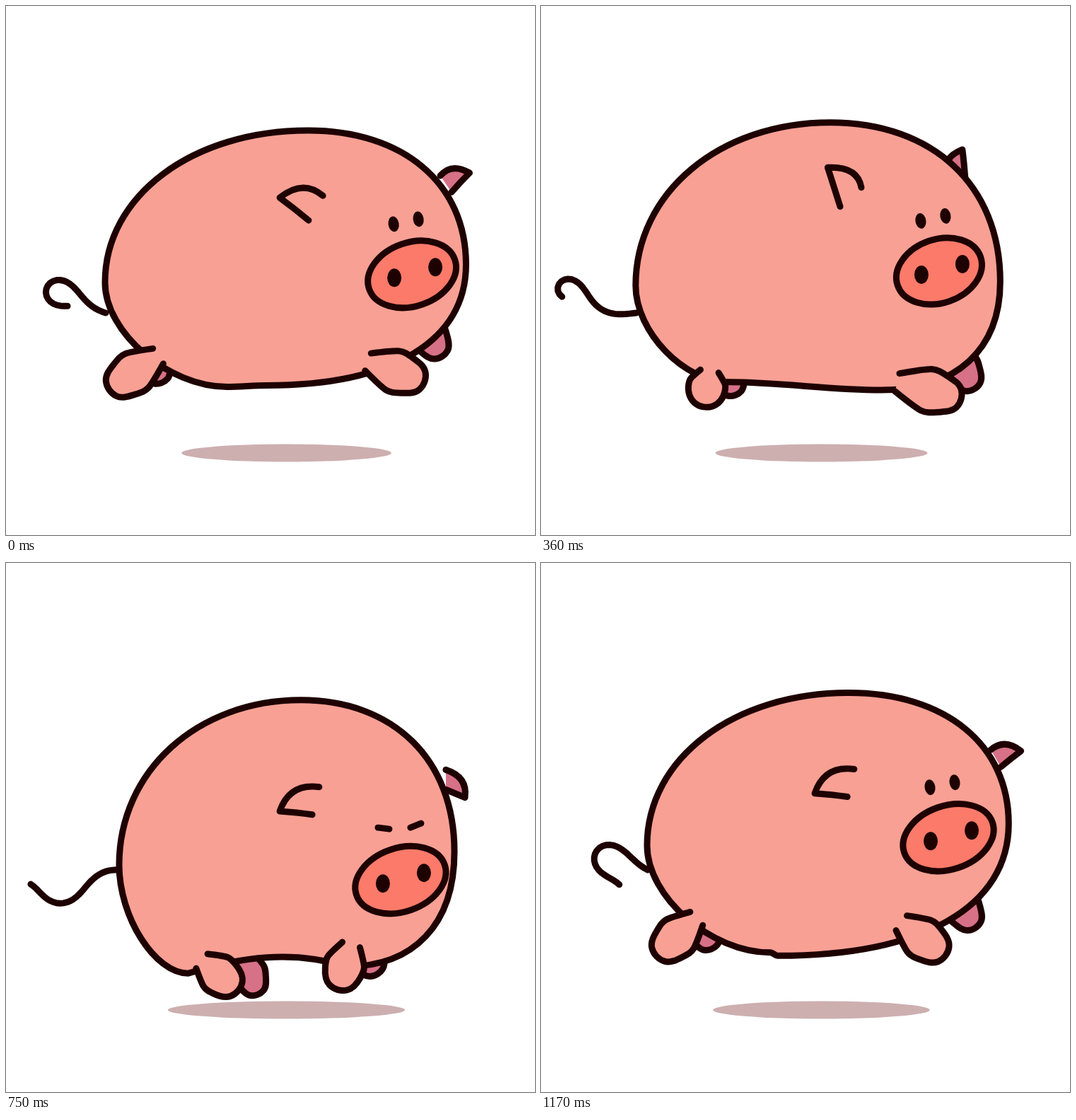
Animation of 748 by 748 pixels, one loop 1200 ms. Source, as an HTML page with a canvas:

```html
<!DOCTYPE html>
<html lang="en">
<head>
<meta charset="utf-8">
<title>Running pig</title>
<style>
  html, body { margin: 0; width: 100%; height: 100%; overflow: hidden; background: #fff; }
  canvas { display: block; }
</style>
</head>
<body>
<canvas id="stage" width="748" height="748"></canvas>
<script>
const ctx = document.getElementById('stage').getContext('2d');
const INK = '#1e0202', SKIN = '#f9a094', SNOUT = '#fc7a6a', FAR = '#d77187', SHADOW = '#cdafb0';
const STEP = 30, POSES = 10, LINE = 9, RAD = Math.PI / 180;
let pose = 0;

// Value that swings once per stride, with an optional bounce twice per stride.
// Peaks are given in poses.
function swing(mean, amp, peak, bounce = 0, bouncePeak = 0) {
  const turn = 2 * Math.PI / POSES;
  return mean + amp * Math.cos(turn * (pose - peak))
    + bounce * Math.cos(2 * turn * (pose - bouncePeak));
}

const lerp = (a, b, t) => [a[0] + (b[0] - a[0]) * t, a[1] + (b[1] - a[1]) * t];

function paint(fill, width = LINE) {
  if (fill) { ctx.fillStyle = fill; ctx.fill(); }
  if (width) { ctx.lineWidth = width; ctx.stroke(); }
}

function oval(x, y, rx, ry, tilt, fill, width = 0) {
  ctx.beginPath();
  ctx.ellipse(x, y, rx, ry, tilt, 0, Math.PI * 2);
  paint(fill, width);
}

function line(x1, y1, x2, y2, width) {
  ctx.beginPath();
  ctx.moveTo(x1, y1);
  ctx.lineTo(x2, y2);
  paint(null, width);
}

// Open smooth curve; tangents are exact for points on an arc.
function spline(points) {
  const handle = (i, dir) => {
    const [x, y] = points[i], [px, py] = points[i - 1], [nx, ny] = points[i + 1];
    const d1 = Math.hypot(x - px, y - py), d2 = Math.hypot(nx - x, ny - y);
    const tx = (x - px) / d1 * d2 + (nx - x) / d2 * d1;
    const ty = (y - py) / d1 * d2 + (ny - y) / d2 * d1;
    const k = dir * 0.345 * (dir > 0 ? d2 : d1) / Math.hypot(tx, ty);
    return [x + tx * k, y + ty * k];
  };
  const last = points.length - 1;
  ctx.beginPath();
  ctx.moveTo(...points[0]);
  for (let i = 0; i < last; i++) {
    const c1 = handle(Math.max(i, 1), i ? 1 : -1);
    const c2 = i + 1 < last ? handle(i + 1, -1) : handle(i, 1);
    ctx.bezierCurveTo(...c1, ...c2, ...points[i + 1]);
  }
}

// Egg of four quarter curves between its extremes, with an arching belly.
function body() {
  const left = [swing(150, 17, 6.5), swing(409, 20, 5.7)];
  const top = [swing(422, 16, 8), swing(180.5, 11, 6, 7, 4.3)];
  const right = [swing(650, 12, 8.7, 8, 2.7), swing(383, 36, 3.5, 20, 3.9)];
  const front = [swing(425, 95, 3.5), swing(557, 18, 5.5, 11, 3.5)];
  const rear = [swing(285, 40, 8.7), swing(554, 22, 5.5, 10, 4.2)];
  const arch = Math.max(0, swing(0, 25, 4.5));
  const third = (front[0] - rear[0]) / 3;
  const quarter = (from, to, corner, fullness) =>
    ctx.bezierCurveTo(...lerp(from, corner, fullness), ...lerp(to, corner, fullness), ...to);

  ctx.beginPath();
  ctx.moveTo(...top);
  quarter(top, right, [right[0], top[1]], 0.605);
  quarter(right, front, [right[0], front[1]], 0.63);
  ctx.bezierCurveTo(front[0] - third, front[1] - arch, rear[0] + third, rear[1] - arch, ...rear);
  quarter(rear, left, [left[0], rear[1]], 0.48);
  quarter(left, top, [left[0], top[1]], 0.57);
  ctx.closePath();
  paint(SKIN);
}

// A wave runs down the tail and grows towards the tip.
function tail() {
  const steps = 30, length = 152;
  let x = swing(151, 17, 6.5), y = 434;
  ctx.beginPath();
  ctx.moveTo(x, y);
  for (let i = 0; i < steps; i++) {
    const s = (i + 0.5) / steps;
    const rise = RAD * swing(10 - 85 * s * s, 20 + 95 * s, 7.6 * s - 2);
    x -= Math.cos(rise) * length / steps;
    y -= Math.sin(rise) * length / steps;
    ctx.lineTo(x, y);
  }
  paint();
}

// Drop shape: from the rear of the hip round the foot to the front of the hip.
function leg(hip, foot, radius, fill) {
  const dx = foot[0] - hip[0], dy = foot[1] - hip[1], len = Math.hypot(dx, dy);
  const along = [dx / len, dy / len], rearward = [-dy / len, dx / len];
  const from = ([x, y], out, down) =>
    [0, 1].map(i => [x, y][i] + rearward[i] * out + along[i] * down);
  const sole = [90, 30, -30, -90].map(a =>
    from(foot, radius * Math.sin(a * RAD), radius * Math.cos(a * RAD)));
  spline([from(hip, 13, 0), ...sole, from(hip, -13, 0)]);
  paint(fill);
}

// Ear flapping about its base; side is -1 or 1, a positive angle droops.
function ear(x, y, side, degrees, length, fill) {
  const a = degrees * RAD, c = Math.cos(a), s = Math.sin(a);
  const at = (out, up) =>
    [x + side * (c * out + s * up) * length, y + (s * out - c * up) * length];
  const baseAngle = (68 + degrees / 2) * RAD;
  const bx = -side * 0.38 * length * Math.cos(baseAngle), by = -0.38 * length * Math.sin(baseAngle);
  ctx.beginPath();
  ctx.moveTo(x + bx, y + by);
  ctx.quadraticCurveTo(...at(0.54, 0.65), ...at(1, 0));
  ctx.quadraticCurveTo(...at(0.56, -0.16), x - bx, y - by);
  paint(fill);
}

function face() {
  const x = swing(566, 10, 9), y = swing(406, 38, 5.7, 8, 5.2);
  oval(x, y, swing(65, 3, 7), 45, -0.33, SNOUT, LINE);
  oval(x - 25, y + 5, 10, 13, 0, INK);
  oval(x + 33, y - 10, 10, 13, 0, INK);
  if (pose >= 5 && pose <= 7) {
    line(x - 32, y - 74, x - 16, y - 72, LINE);
    line(x + 14, y - 74, x + 29, y - 80, LINE);
  } else {
    oval(x - 26, y - 71, 7.5, 11, -0.15, INK);
    oval(x + 9, y - 78, 7.5, 11, -0.15, INK);
  }
}

function draw() {
  ctx.fillStyle = '#fff';
  ctx.fillRect(0, 0, 748, 748);
  ctx.strokeStyle = INK;
  ctx.lineCap = ctx.lineJoin = 'round';

  oval(396.5, 632, swing(158, 11, 5.8), 12.5, 0, SHADOW);
  ear(swing(622, 36, 7.5), swing(279, 43, 6.4), 1, swing(-12, 58, 6.5, 24, 0.4), 37, FAR);

  const farHind = [swing(282, 70, 4.6, 18, 3.7), swing(553, 40, 5.4)];
  const farFront = [swing(567, 52, 0.8, 18, 3.4), swing(526, 46, 4.4, 20, 3.5)];
  leg([farHind[0] - 15, farHind[1] - 40], farHind, 20, FAR);
  leg([farFront[0] - 25, farFront[1] - 40], farFront, 22, FAR);

  tail();
  body();

  leg([swing(246, 31, 4.9), swing(529, 34, 5.1)],
      [swing(239, 76, 4.4, 18, 3.7), swing(558, 31, 5.4)], 26, SKIN);
  leg([swing(500, 12, 0), swing(525, 25, 3.8, 11, 3.5)],
      [swing(527, 54, 0.9, 8, 3.2), swing(557, 28, 5, 10, 3.2)], 26, SKIN);

  ear(438, swing(311, 43, 6.5), -1, swing(0, 52, 7), 53);
  face();
}

function tick() {
  pose = Math.floor(performance.now() / STEP) % POSES;
  draw();
  requestAnimationFrame(tick);
}
tick();
</script>
</body>
</html>
```
